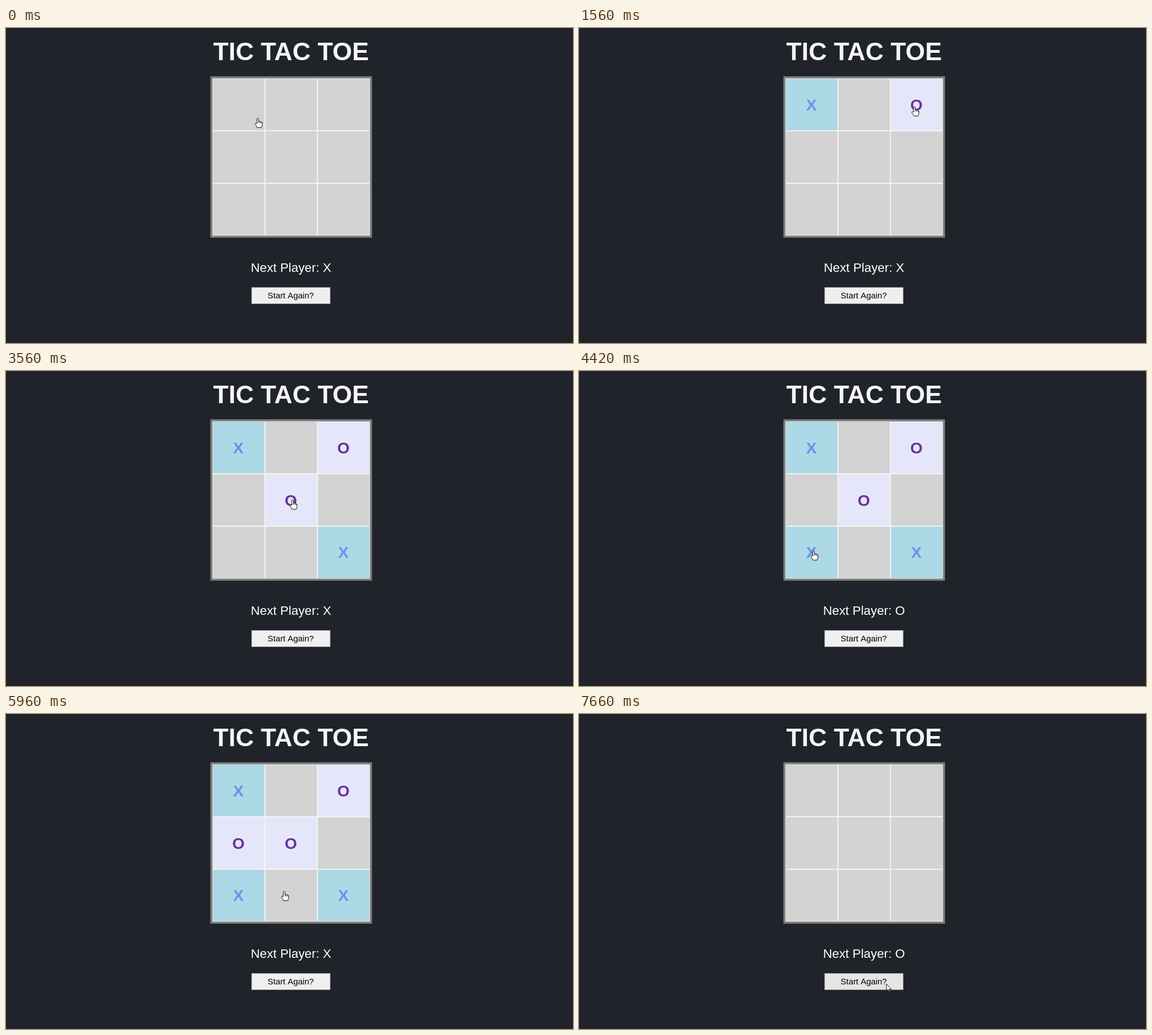
Write an HTML page with a canvas that moves like this. It is 1003 by 558 pixels and loops after 7.74 s.

```html
<!DOCTYPE html>
<html lang="en">
<head>
<meta charset="utf-8">
<title>Tic Tac Toe</title>
<style>
  html, body { margin: 0; width: 100%; height: 100%; overflow: hidden; background: #20232a; }
  canvas { display: block; }
</style>
</head>
<body>
<canvas id="stage" width="1003" height="558"></canvas>
<script>
const ctx = document.getElementById('stage').getContext('2d');
const LOOP = 7740, STEP = 77;
const CENTER = 504.2;
const BOARD = { x: 365.3, y: 89.3, cell: 92.8, frame: 3.7, line: 0.93 };
const BUTTON = { x: 434, y: 459, w: 140, h: 30 };
const FONT = '"Liberation Sans", Arial, sans-serif';

const MARKS = {
  X: { fill: '#add8e6', ink: '#6495ed' },
  O: { fill: '#e6e6fa', ink: '#663399' }
};

// Players alternate, X first: when the move lands and in which cell.
const MOVES = [[550, 0], [1560, 2], [2710, 8], [3560, 4], [4420, 6], [5350, 3], [6190, 7]];
const WIN = 6190, RESET = 7270;

// Pointer trips: start time, number of steps, destination, optional bend point.
const HOME = [445.5, 159.5];
const TRIPS = [
  { at: 80, steps: 3, to: [420, 133.5] },
  { at: 780, steps: 7, to: [593.5, 139] },
  { at: 1790, steps: 11, to: [580, 317], bend: [562, 240] },
  { at: 2790, steps: 7, to: [507, 228], bend: [540, 300] },
  { at: 3880, steps: 6, to: [415, 318] },
  { at: 4650, steps: 8, to: [415, 228] },
  { at: 5650, steps: 6, to: [504, 321], bend: [454, 293] },
  { at: 6590, steps: 5, to: [533.5, 476] },
  { at: 7350, steps: 2, to: [536.5, 476] },
  { at: 7580, steps: 2, to: [544, 478.5] }
];

// Click highlights: start and end.
const CLICKS = [[400, 550], [1410, 1560], [2560, 2710], [3400, 3560],
  [4270, 4420], [5180, 5350], [6040, 6190], [7140, 7270]];

const HAND = new Path2D('M-1.6 10V1.8C-1.6 -.1 1.4 -.1 1.4 1.8V6C2 5.2 3.9 5.4 4 6.6' +
  'C4.8 6 6.2 6.3 6.3 7.4C7 7.1 7.8 7.5 7.8 8.4V12C7.8 13.6 6.6 14.6 6.4 17H-1.2' +
  'C-1.6 15 -4 12.6 -4.8 10.4C-5 9 -3.4 8.6 -2.6 9.4Z');
const KNUCKLES = new Path2D('M1.4 6V9M4 6.6V9.2M6.3 7.4V9.4');
const ARROW = new Path2D('M0 0V12L2.8 9.4L4.6 13.6L6.4 12.8L4.6 8.8H8.4Z');

const ease = u => u * (1 + u * (3 - 2 * u)) / 2;

function pointerAt(t) {
  let from = HOME;
  for (const { at, steps, to, bend } of TRIPS) {
    if (t < at) break;
    const done = Math.floor((t - at + 4) / STEP) + 1;
    if (done < steps) {
      const s = ease(done / steps);
      return from.map((a, i) => {
        const mid = bend ? bend[i] : (a + to[i]) / 2;
        return (1 - s) ** 2 * a + 2 * s * (1 - s) * mid + s * s * to[i];
      });
    }
    from = to;
  }
  return from;
}

function text(str, x, y, font, color) {
  ctx.font = `${font} ${FONT}`;
  ctx.fillStyle = color;
  ctx.textAlign = 'center';
  ctx.fillText(str, x, y);
}

function rect(x, y, w, h, color) {
  ctx.fillStyle = color;
  ctx.fillRect(x, y, w, h);
}

function drawBoard(marks) {
  const { x, y, cell, frame, line } = BOARD;
  const size = cell * 3;
  rect(x - frame, y - frame, size + 2 * frame, size + 2 * frame, '#808080');
  rect(x, y, size, size, '#f5f5f5');
  for (let i = 0; i < 9; i++) {
    const cx = x + (i % 3) * cell, cy = y + Math.floor(i / 3) * cell;
    const mark = MARKS[marks[i]];
    rect(cx + line, cy + line, cell - 2 * line, cell - 2 * line, mark ? mark.fill : '#d3d3d3');
    if (mark) text(marks[i], cx + cell / 2 - 0.5, cy + cell / 2 + 10, 'bold 28px', mark.ink);
  }
}

function drawButton(hover, pressed) {
  const { x, y, w, h } = BUTTON;
  rect(x, y, w, h, '#808184');
  rect(x + 0.9, y + 0.9, w - 1.8, h - 1.8, pressed ? '#f5f5f2' : hover ? '#e5e5e5' : '#efefef');
  text('Start Again?', CENTER - 0.5, 479.3, '14.85px', '#000');
}

function drawPointer([x, y], clicking) {
  ctx.save();
  ctx.translate(x, y);
  if (clicking) {
    ctx.fillStyle = 'rgba(255, 240, 0, 0.62)';
    ctx.beginPath();
    ctx.arc(0, 0.5, 8.8, 0, Math.PI * 2);
    ctx.fill();
  }
  const onBoard = y < 371;
  const shape = onBoard ? HAND : ARROW;
  ctx.fillStyle = '#fff';
  ctx.strokeStyle = '#000';
  ctx.lineWidth = 0.95;
  ctx.lineJoin = 'round';
  ctx.fill(shape);
  ctx.stroke(shape);
  if (onBoard) ctx.stroke(KNUCKLES);
  ctx.restore();
}

function draw(t) {
  const marks = [];
  const played = MOVES.filter(([at]) => t >= at);
  if (t < RESET) played.forEach(([, cell], i) => { marks[cell] = 'XO'[i % 2]; });
  const won = t >= WIN && t < RESET;
  const status = won ? 'Winner: X' : 'Next Player: ' + 'XO'[played.length % 2];

  const pointer = pointerAt(t);
  const clicking = CLICKS.some(([from, to]) => t >= from && t < to);
  const hover = pointer[1] >= BUTTON.y;

  rect(0, 0, 1003, 558, '#20232a');
  text('TIC TAC TOE', CENTER, 57, 'bold 44.5px', '#f5f5f5');
  drawBoard(marks);
  text(status, CENTER, 432, '22.3px', '#fff');
  drawButton(hover, hover && clicking);
  drawPointer(pointer, clicking);
}

const start = performance.now();
function frame() {
  draw((performance.now() - start) % LOOP);
  requestAnimationFrame(frame);
}
frame();
</script>
</body>
</html>
```
